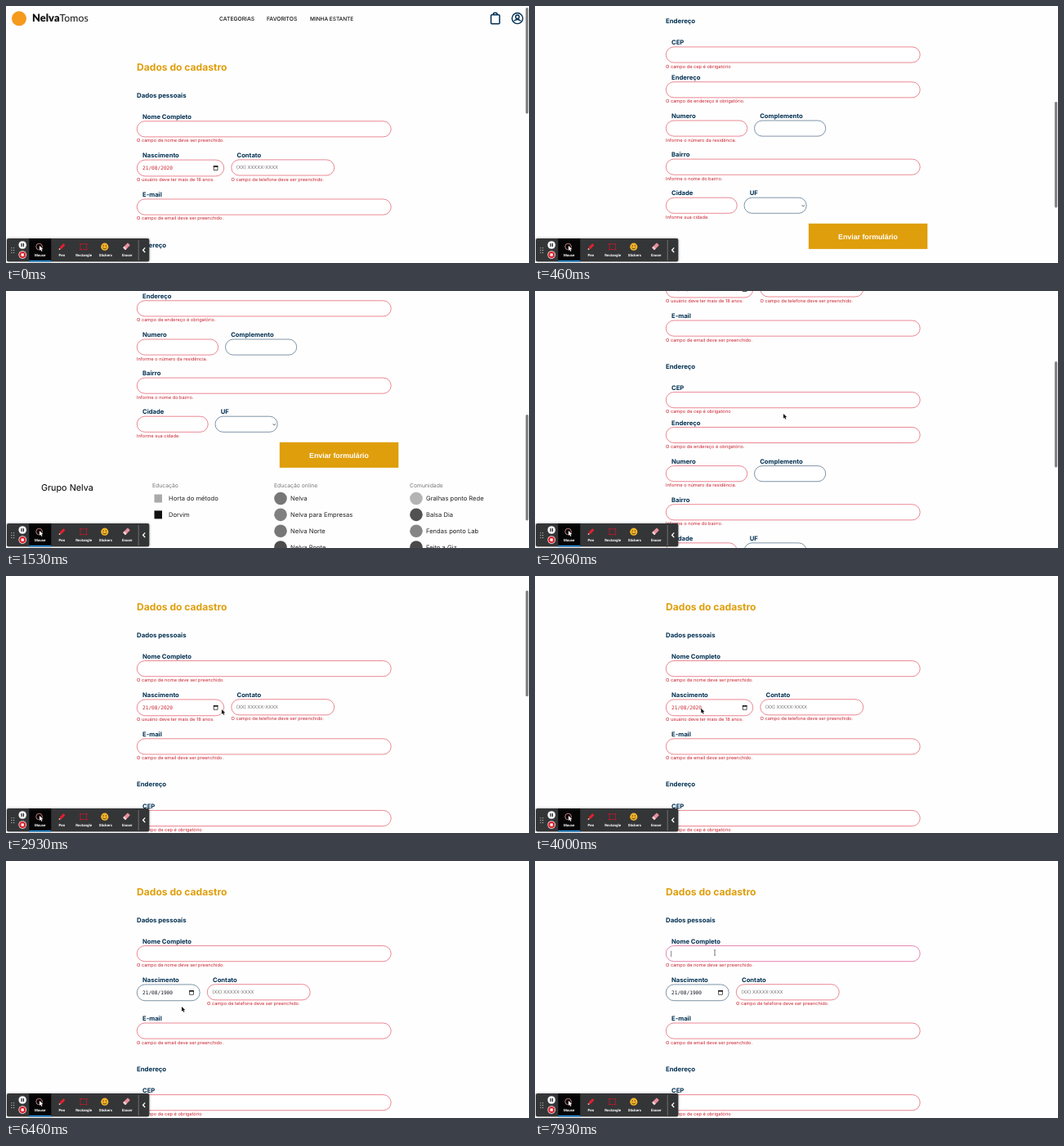
Recreate the animation shown at these times as an HTML page with a canvas. Size 640 by 314 pixels, loop 8000 ms.

```html
<!DOCTYPE html>
<html lang="pt-BR">
<head>
<meta charset="utf-8">
<title>Cadastro</title>
<style>
html, body { margin: 0; width: 100%; height: 100%; overflow: hidden; background: #fefefe; }
canvas { display: block; width: 640px; height: 314px; }
</style>
</head>
<body>
<canvas id="stage"></canvas>
<script>
const W = 640, H = 314, LOOP = 8000;
const NAVY = '#002f52', RED = '#cb2431', GOLD = '#df9e0b';
const EDGE = '#e0475a', SLATE = '#3c5a78', PINK = '#d8438c';
const SANS = 'Inter, sans-serif';

// time, scroll offset
const SCROLL = [[0, 0], [60, 8], [250, 120], [450, 268], [650, 372], [860, 413.5], [1130, 431],
  [1300, 425], [1530, 355.2], [1700, 270], [1860, 200.5], [2060, 200.5], [2260, 115], [2460, 58], [2660, 37.3]];
// time, pointer x, pointer y
const POINTER = [[2060, 304, 150], [2660, 270, 161], [2900, 270, 161], [2930, 264, 163],
  [3460, 226, 166], [4100, 199, 161], [6130, 199, 161], [6330, 215, 178],
  [7130, 215, 178], [7600, 220, 112]];
const FOCUS_DATE = 4200, YEAR_PICK = 5260, BLUR = 6400, FOCUS_NAME = 7600;
const TYPING = [[5660, '0001'], [5800, '0019'], [5930, '0190'], [6060, '1900']];

const canvas = document.getElementById('stage');
const ctx = canvas.getContext('2d');
const dpr = window.devicePixelRatio || 1;
canvas.width = W * dpr;
canvas.height = H * dpr;
ctx.textRendering = 'geometricPrecision';

function at(keys, t) {
  if (t <= keys[0][0]) return keys[0].slice(1);
  for (let i = 1; i < keys.length; i++) {
    const a = keys[i - 1], b = keys[i];
    if (t < b[0]) {
      const k = (t - a[0]) / (b[0] - a[0]);
      return a.slice(1).map((v, j) => v + (b[j + 1] - v) * k);
    }
  }
  return keys[keys.length - 1].slice(1);
}

// y is the optical middle of the line
function text(str, x, y, size, color, weight = 400, family = SANS, align = 'left') {
  ctx.font = `${weight} ${size}px ${family}`;
  ctx.textAlign = align;
  ctx.fillStyle = color;
  ctx.fillText(str, x, y + size * 0.34);
  return ctx.measureText(str).width;
}

function rect(x, y, w, h, color) {
  ctx.fillStyle = color;
  ctx.fillRect(x, y, w, h);
}

function box(x, y, w, h, r) {
  ctx.beginPath();
  ctx.roundRect(x, y, w, h, r);
}

function dot(x, y, r, color) {
  ctx.fillStyle = color;
  ctx.beginPath();
  ctx.arc(x, y, r, 0, 7);
  ctx.fill();
}

function path(points, color, width, close) {
  ctx.beginPath();
  points.forEach(([x, y]) => ctx.lineTo(x, y));
  if (close) ctx.closePath();
  ctx.strokeStyle = color;
  ctx.lineWidth = width;
  ctx.stroke();
}

const label = (str, x, y) => text(str, x, y, 7.65, NAVY, 700);
const error = (str, x, y) => text(str, x, y, 5.65, RED);

function pill(x, y, w, color = EDGE, h = 19.1) {
  box(x + 0.3, y, w - 0.6, h, h / 2);
  ctx.fillStyle = '#fff';
  ctx.fill();
  ctx.strokeStyle = color;
  ctx.lineWidth = 0.65;
  ctx.stroke();
}

function field(name, x, y, w, message, color) {
  label(name, x + 7, y);
  pill(x, y + 5.5, w, color);
  if (message) error(message, x, y + 29.1);
}

function header() {
  dot(16, 15.5, 9, '#f59a1c');
  const w = text('Nelva', 32, 14.6, 12.9, '#111', 900, 'Lato, sans-serif');
  text('Tomos', 32 + w, 14.6, 12.3, '#111', 400, 'Lato, sans-serif');
  text('CATEGORIAS', 261, 15.5, 6.75, '#111', 500);
  text('FAVORITOS', 319, 15.5, 6.75, '#111', 500);
  text('MINHA ESTANTE', 372, 15.5, 6.5, '#111', 500);
  ctx.strokeStyle = NAVY;
  ctx.lineWidth = 1.5;
  box(593.5, 11, 10.5, 10.8, 1);
  ctx.stroke();
  ctx.beginPath();
  ctx.arc(598.7, 11, 2.6, Math.PI, 0);
  ctx.stroke();
  ctx.lineWidth = 1.4;
  ctx.beginPath();
  ctx.arc(625.8, 15.2, 6.6, 0, 7);
  ctx.stroke();
  ctx.beginPath();
  ctx.arc(625.8, 13.3, 2.2, 0, 7);
  ctx.stroke();
  ctx.beginPath();
  ctx.arc(625.8, 22, 5.4, Math.PI * 1.22, Math.PI * 1.78);
  ctx.stroke();
}

function birthRow(t, valid) {
  const focused = t >= FOCUS_DATE && t < BLUR;
  const w = valid ? 77.5 : 107;
  const typed = TYPING.filter(k => t >= k[0]).pop();
  const mono = '"DejaVu Sans Mono", monospace';
  const ink = valid ? '#10151c' : RED;
  label('Nascimento', 167, 182.6);
  pill(160, 188.2, w, valid ? SLATE : focused ? PINK : EDGE, 19.8);
  if (focused) {
    const year = t >= YEAR_PICK;
    rect(year ? 189 : 166.6, 194, year ? 15.4 : 8, 8, '#a9cdf1');
  }
  text('21/08/' + (typed ? typed[1] : '2020'), 167, 198.1, 6.15, ink, 400, mono);
  const x = 160 + w - 12.8;
  ctx.strokeStyle = '#111';
  ctx.lineWidth = 0.7;
  ctx.strokeRect(x, 195.9, 4.8, 4.6);
  rect(x - 0.3, 195.3, 5.4, 1.6, '#111');
  if (!valid) error('O usuário deve ter mais de 18 anos.', 160, 212.5);

  const cx = valid ? 246 : 275.5;
  label('Contato', cx + 7, 182.6);
  pill(cx, 188, 126.5);
  text('(XX) XXXXX-XXXX', cx + 6.3, 197.6, 5.75, '#6c6c6c');
  error('O campo de telefone deve ser preenchido.', cx, 211.8);
}

function addressForm() {
  text('Endereço', 160, 292, 7.8, NAVY, 700);
  field('CEP', 160, 318.2, 311.5, 'O campo de cep é obrigatório');
  field('Endereço', 160, 361, 311.5, 'O campo de endereço é obrigatório.');
  field('Numero', 160, 408.2, 100, 'Informe o número da residência.');
  field('Complemento', 268.2, 408.2, 87.8, '', SLATE);
  field('Bairro', 160, 455.3, 311.5, 'Informe o nome do bairro.');
  field('Cidade', 160, 502.4, 87.5, 'Informe sua cidade.');
  field('UF', 255.7, 502.4, 76.8, '', SLATE);
  path([[326.7, 517], [328.3, 518.7], [329.9, 517]], '#333', 0.8);
  rect(334.8, 539.5, 145.5, 31.1, GOLD);
  text('Enviar formulário', 407.5, 555.4, 8.8, '#fff', 700, '"Liberation Sans", sans-serif', 'center');
}

function linkColumn(title, x, textX, names, tones, square) {
  text(title, x, 592.7, 6.8, '#777');
  names.forEach((name, i) => {
    const y = 608.2 + i * 19.85;
    if (square) rect(x + 2.5, y - 5, 9.5, 10, tones[i]);
    else dot(x + 8, y, 7.8, tones[i]);
    text(name, textX, y, 7.6, '#222');
  });
}

function footer() {
  text('Grupo Nelva', 43, 595, 10.8, '#000');
  linkColumn('Educação', 179, 199, ['Horta do método', 'Dorvim'], ['#aaa', '#111'], true);
  linkColumn('Educação online', 328, 348,
    ['Nelva', 'Nelva para Empresas', 'Nelva Norte', 'Nelva Ponte', 'Ritmo Vão', 'Nelva Idioma', 'QV7'],
    ['#777', '#808080', '#777', '#4c4c4c', '#6c6c6c', '#d2d2d2', '#888']);
  linkColumn('Comunidade', 494, 514,
    ['Gralhas ponto Rede', 'Balsa Dia', 'Fendas ponto Lab', 'Feito a Giz', 'Percurso sem cancelas',
      'Gralhas ponto vagas', 'ZOV'],
    ['#b4b4b4', '#515151', '#858585', '#4a4a4a', '#4a4a4a', '#999', '#777']);
}

function page(t, scroll) {
  const valid = t >= BLUR;
  const named = t >= FOCUS_NAME;
  ctx.save();
  ctx.translate(0, -scroll);
  header();
  text('Dados do cadastro', 160, 75, 12.1, GOLD, 700);
  text('Dados pessoais', 160, 109.3, 7.85, NAVY, 700);
  field('Nome Completo', 160, 135.4, 311.5, 'O campo de nome deve ser preenchido.', named ? PINK : EDGE);
  if (named) rect(166.4, 147, 0.7, 7.4, '#555');
  birthRow(t, valid);
  if (valid) ctx.translate(0, -0.8);
  field('E-mail', 160, 230.6, 311.5, 'O campo de email deve ser preenchido.');
  addressForm();
  footer();
  ctx.restore();
}

function scrollbar(t, scroll) {
  ctx.globalAlpha = Math.max(0, Math.min(1, (3460 - t) / 260));
  box(635.9, 2 + scroll * 0.42, 3.3, 129.5, 1.7);
  ctx.fillStyle = '#838383';
  ctx.fill();
  ctx.globalAlpha = 1;
}

function arrow(x, y, scale, fill, edge) {
  ctx.save();
  ctx.translate(x, y);
  ctx.scale(scale, scale);
  ctx.lineJoin = 'round';
  path([[0, 0], [0, 6], [1.4, 4.8], [2.5, 7], [3.6, 6.5], [2.6, 4.4], [4.4, 4.3]], edge, 1, true);
  ctx.fillStyle = fill;
  ctx.fill();
  ctx.restore();
}

function pointer(t) {
  if (t < POINTER[0][0]) return;
  const [x, y] = at(POINTER, t);
  if (y < 123 && y > 104) {
    path([[x - 1.2, y - 3.6], [x, y - 3], [x + 1.2, y - 3.6]], '#555', 0.6);
    path([[x, y - 3], [x, y + 3]], '#555', 0.8);
    path([[x - 1.2, y + 3.6], [x, y + 3], [x + 1.2, y + 3.6]], '#555', 0.6);
  } else arrow(x, y, 0.95, '#111', '#fff');
}

function tilted(x, y, w, h, color) {
  ctx.save();
  ctx.translate(x, y);
  ctx.rotate(-Math.PI / 4);
  box(-w / 2, -h / 2, w, h, 0.7);
  ctx.fillStyle = color;
  ctx.fill();
  ctx.restore();
}

function toolbar() {
  ctx.save();
  ctx.shadowColor = 'rgba(0,0,0,.4)';
  ctx.shadowBlur = 3 * dpr;
  box(1, 284, 174.3, 28.3, 2);
  ctx.fillStyle = '#343537';
  ctx.fill();
  ctx.restore();
  rect(28.3, 284, 27, 28.3, '#050505');
  rect(28.3, 310.8, 27, 1.5, '#2196e8');
  for (let i = 0; i < 6; i++) dot(6.9 + (i % 2) * 2.7, 295.6 + (i >> 1) * 2.9, 0.65, '#bbb');

  dot(20.2, 292, 4.8, '#f4f4f4');
  rect(18.5, 290, 1.2, 4, '#222');
  rect(20.8, 290, 1.2, 4, '#222');
  dot(20.2, 304, 4.8, '#f4f4f4');
  dot(20.2, 304, 4, '#d8232f');
  rect(18.6, 302.4, 3.2, 3.2, '#fff');

  ctx.strokeStyle = '#d98a8f';
  ctx.lineWidth = 0.9;
  ctx.beginPath();
  ctx.arc(40.6, 294, 3.8, 0, 7);
  ctx.stroke();
  arrow(41, 293, 0.95, '#fff', '#222');

  tilted(69, 293.6, 7, 3, '#e3202f');
  tilted(65.6, 297, 1.8, 2, '#f5b7a4');
  ctx.strokeStyle = '#b51c28';
  ctx.lineWidth = 0.8;
  ctx.strokeRect(91, 290.8, 7.6, 6.6);
  for (const x of [91, 98.6]) for (const y of [290.8, 297.4]) rect(x - 0.8, y - 0.8, 1.6, 1.6, '#b51c28');

  dot(120.8, 294.2, 4.6, '#f3b52c');
  dot(119.2, 293, 0.7, '#513300');
  dot(122.4, 293, 0.7, '#513300');
  ctx.strokeStyle = '#513300';
  ctx.lineWidth = 0.8;
  ctx.beginPath();
  ctx.arc(120.8, 294.4, 2.4, 0.3, 2.8);
  ctx.stroke();
  tilted(147.6, 293.6, 8, 4.2, '#e88f9b');
  tilted(145.4, 295.8, 2.4, 4.2, '#f4d3d6');

  [['Mouse', 41.6], ['Pen', 68.3], ['Rectangle', 95.2], ['Stickers', 121.8], ['Eraser', 148.3]]
    .forEach(([name, x]) => text(name, x, 304.3, 4.4, '#fff', 700, 'Roboto, sans-serif', 'center'));
  rect(161.8, 286, 0.7, 25, '#8a8a8a');
  path([[170.2, 295.4], [167.6, 298.2], [170.2, 301]], '#fff', 1.3);
}

function draw(now) {
  const t = now % LOOP;
  const [scroll] = at(SCROLL, t);
  ctx.setTransform(dpr, 0, 0, dpr, 0, 0);
  rect(0, 0, W, H, '#fefefe');
  page(t, scroll);
  scrollbar(t, scroll);
  toolbar();
  pointer(t);
}

const start = performance.now();
function tick() {
  draw(performance.now() - start);
  requestAnimationFrame(tick);
}
tick();
</script>
</body>
</html>
```
